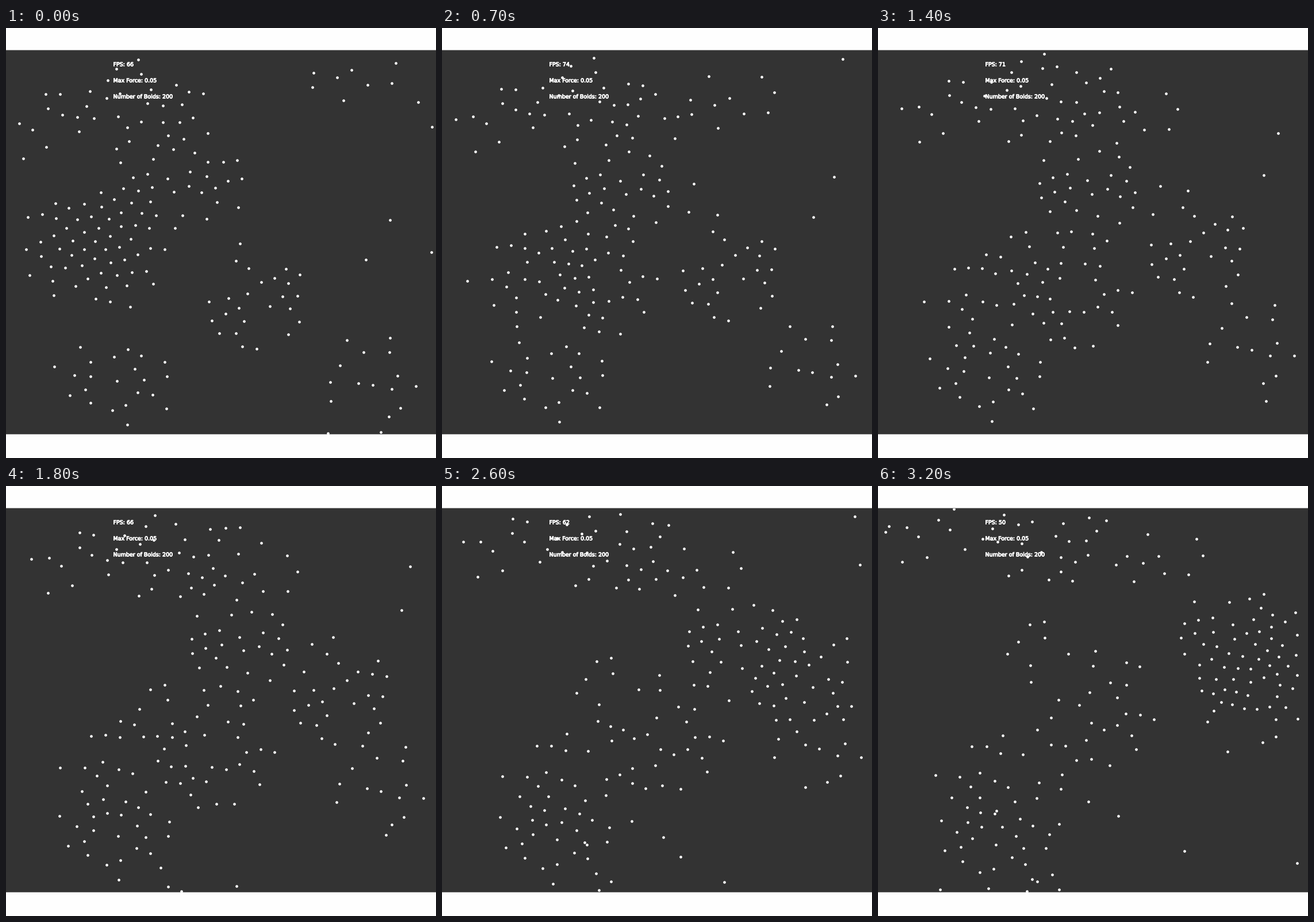
Animation, 748 px wide and 748 px high, one loop 3.3 s. Source, as a matplotlib script:

```python
import numpy as np
import matplotlib.pyplot as plt
from matplotlib.animation import FuncAnimation
from matplotlib.patches import Rectangle
import matplotlib.patheffects as pe

SIZE, DPI = 748, 100
FRAMES, STEP_MS = 33, 100
TOP, BOTTOM = 38.5, 706.7
GAP = 25
LONERS, LONER_SPEED = 8, 11
GOLDEN = np.pi * (3 - np.sqrt(5))

rng = np.random.default_rng(11)
times = np.arange(FRAMES)


def px(n):
    return n * 72 / DPI


def arc(start, mid, end):
    """Parabola through three points, one position per frame."""
    t = (times / (FRAMES - 1))[:, None]
    return (2 * (t - 0.5) * (t - 1) * np.array(start)
            + 4 * t * (1 - t) * np.array(mid)
            + 2 * t * (t - 0.5) * np.array(end))


def flock(n, radii, *points):
    """n boids spread over an ellipse that drifts along an arc."""
    k = np.arange(n)
    r = np.sqrt((k + 0.5) / n) + rng.normal(0, 0.1, n)
    a = k * GOLDEN + rng.uniform(0, 2 * np.pi) + rng.normal(0, 0.25, n)
    a = a + 0.008 * times[:, None]
    ring = np.stack([r * np.cos(a), r * np.sin(a)], axis=2)
    return arc(*points)[:, None] + ring * radii


def loners(n):
    """Single boids heading up, each slowly turning."""
    heading = rng.normal(-np.pi / 2, 0.5, n) + rng.normal(0, 0.02, n) * times[:, None]
    step = LONER_SPEED * np.stack([np.cos(heading), np.sin(heading)], axis=2)
    return rng.uniform(0, SIZE, (n, 2)) + np.cumsum(step, axis=0)


def separate(p, rounds):
    """Push apart boids that are closer than GAP."""
    for _ in range(rounds):
        d = p[:, None] - p[None]
        dist = np.hypot(d[..., 0], d[..., 1]) + 1e-6
        force = np.clip(GAP - dist, 0, None)
        np.fill_diagonal(force, 0)
        p = p + 0.3 * (d / dist[..., None] * force[..., None]).sum(axis=1)
    return p


def simulate(goal):
    shift = separate(goal[0], 40) - goal[0]
    path = np.empty_like(goal)
    for i, g in enumerate(goal):
        path[i] = separate(g + 0.97 * shift, 4)
        shift = path[i] - g
    path[..., 0] %= SIZE
    path[..., 1] = TOP + (path[..., 1] - TOP) % (BOTTOM - TOP)
    return path


path = simulate(np.concatenate([
    flock(28, (125, 82), (235, 138), (285, 125), (295, 92)),
    flock(28, (115, 75), (285, 280), (385, 282), (615, 260)),
    flock(24, (110, 80), (110, 385), (205, 490), (215, 520)),
    flock(24, (85, 105), (190, 400), (370, 465), (395, 395)),
    flock(8, (60, 45), (130, 350), (255, 395), (270, 275)),
    flock(22, (110, 70), (195, 618), (195, 612), (205, 628)),
    flock(24, (95, 95), (430, 475), (565, 375), (640, 320)),
    flock(14, (90, 75), (630, 605), (645, 530), (655, 370)),
    flock(10, (105, 50), (600, 80), (430, 160), (480, 130)),
    flock(10, (70, 70), (60, 170), (110, 140), (85, 85)),
    loners(LONERS),
], axis=1))

fps = np.interp(times, [0, 3, 10, 18, 23, 26, 32], [66, 71, 76, 66, 66, 62, 50])

fig = plt.figure(figsize=(SIZE / DPI, SIZE / DPI), dpi=DPI, facecolor="#fefefe")
ax = fig.add_axes([0, 0, 1, 1])
ax.set(xlim=(0, SIZE), ylim=(SIZE, 0))
ax.axis("off")
stage = ax.add_patch(Rectangle((0, TOP), SIZE, BOTTOM - TOP,
                               fc="#333333", lw=0, snap=False))

dots = ax.scatter(*path[0].T, s=px(4.7) ** 2, c="white", linewidths=0)
dots.set_clip_path(stage)


def label(y, text):
    return ax.text(186.5, y, text, color="white", family="DejaVu Sans",
                   fontsize=px(9.5), va="baseline",
                   path_effects=[pe.withStroke(linewidth=px(0.9), foreground="white")])


fps_text = label(66.4, "")
label(94.4, "Max Force: 0.05")
label(122.4, f"Number of Boids: {path.shape[1]}")


def draw(i):
    dots.set_offsets(path[i])
    fps_text.set_text(f"FPS: {fps[i]:.0f}")
    return dots, fps_text


anim = FuncAnimation(fig, draw, frames=FRAMES, interval=STEP_MS,
                     repeat=True, repeat_delay=0, blit=False)
plt.show()
```
